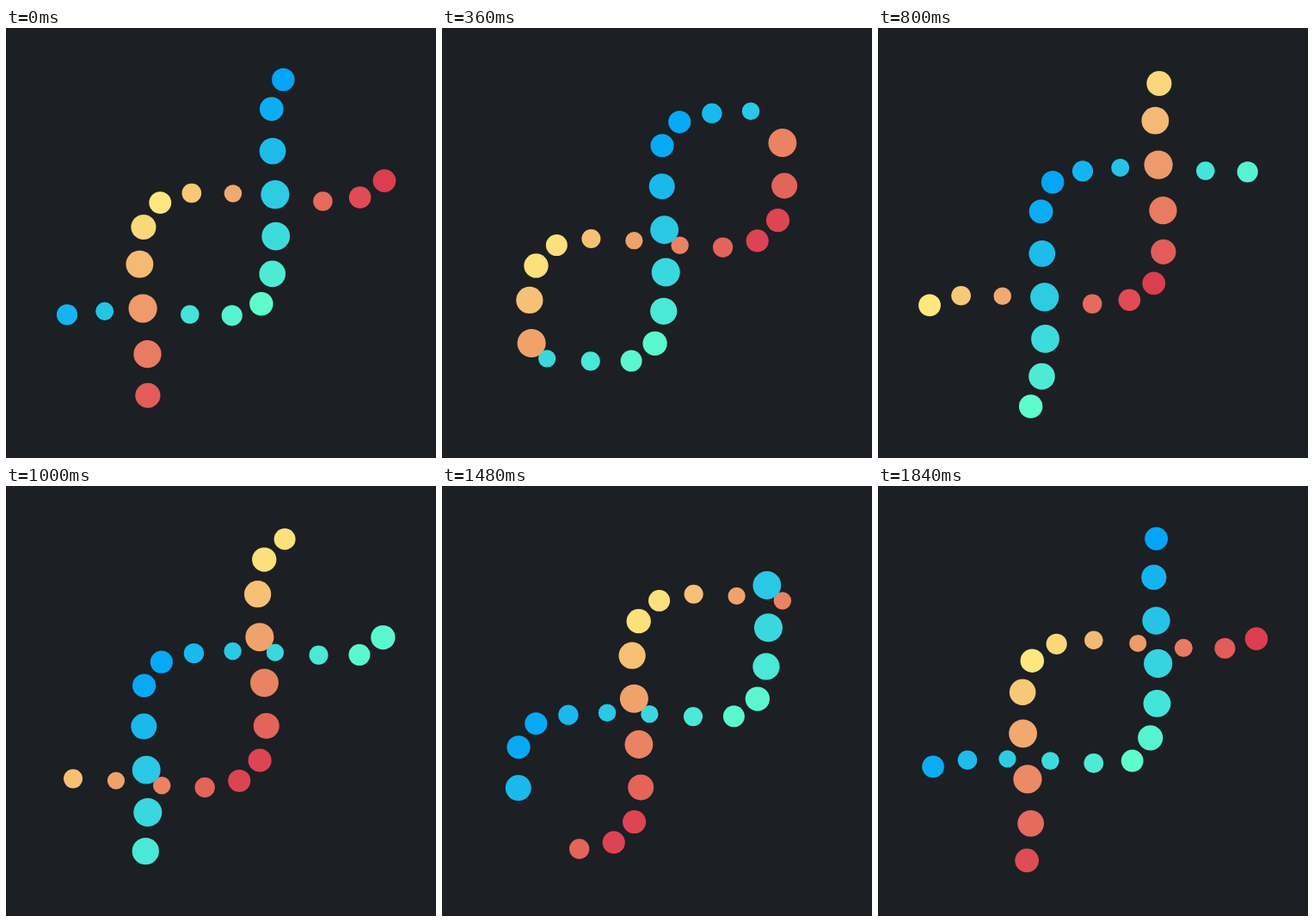
Recreate the animation shown at these times as an HTML page with a canvas. Size 500 by 500 pixels, loop 1920 ms.

```html
<!DOCTYPE html>
<html lang="en">
<head>
<meta charset="utf-8">
<title>Double helix of dots</title>
<style>
  html, body { margin: 0; width: 100%; height: 100%; overflow: hidden; background: #1c1f24; }
  canvas { display: block; width: 500px; height: 500px; }
</style>
</head>
<body>
<canvas id="stage" width="500" height="500"></canvas>
<script>
const ctx = document.getElementById('stage').getContext('2d');

const LOOP = 1920, HALF = LOOP / 2, STEP = 40, LAST_STEP = 46;
const COUNT = 12, DELAY = LOOP / COUNT, LEAD = 40;
const GAP = 33.73, SWING = 84, RADIUS = 40 / 3, SWELL = 10 / 3;

const smooth = x => x * x * (3 - 2 * x);

// cubic-bezier(.333, 0, .833, 1): slow start, short stop
function lateEase(x) {
  let lo = 0, hi = 1;
  for (let i = 0; i < 24; i++) {
    const t = (lo + hi) / 2, q = 1 - t;
    if (t * q * q + 2.5 * t * t * q + t * t * t < x) lo = t; else hi = t;
  }
  return smooth(lo);
}

const strands = [
  { side: -1, ease: lateEase, from: [0, 161, 248], to: [98, 255, 203] },
  { side: 1, ease: smooth, from: [218, 53, 79], to: [255, 239, 128] }
];

// Depth over one cycle (s from 0 to 2), with a short rest at the cycle's ends
function depth(s) {
  if (s < 0.5) return -smooth(2 * s);
  if (s < 1.5) return 2 * smooth(s - 0.5) - 1;
  return 1 - smooth(2 * s - 3);
}

function dot(strand, i, time) {
  const { side, ease, from, to } = strand;
  const s = ((time + LEAD - i * DELAY + LOOP) % LOOP) / HALF;
  const along = ((COUNT - 1) / 2 - i) * GAP;
  const turn = s < 1 ? ease(s) : 1 - ease(s - 1);
  const across = side * SWING * (1 - 2 * turn);
  const mix = s < 1 ? s : 2 - s;
  return {
    x: 250 + (across + along) * Math.SQRT1_2,
    y: 250 + (across - along) * Math.SQRT1_2,
    r: RADIUS - side * SWELL * depth(s),
    color: `rgb(${from.map((c, n) => Math.round(c + (to[n] - c) * mix))})`
  };
}

function draw(time) {
  ctx.fillStyle = '#1c1f24';
  ctx.fillRect(0, 0, 500, 500);
  const dots = strands.flatMap(strand =>
    Array.from({ length: COUNT }, (_, i) => dot(strand, i, time)));
  dots.sort((a, b) => a.r - b.r);
  for (const { x, y, r, color } of dots) {
    ctx.fillStyle = color;
    ctx.beginPath();
    ctx.arc(x, y, r, 0, 2 * Math.PI);
    ctx.fill();
  }
}

const start = performance.now();

// 25 poses a second; the last one is held for two steps
function tick() {
  const time = (performance.now() - start + 4) % LOOP;
  draw(Math.min(Math.floor(time / STEP), LAST_STEP) * STEP);
  requestAnimationFrame(tick);
}
tick();
</script>
</body>
</html>
```
